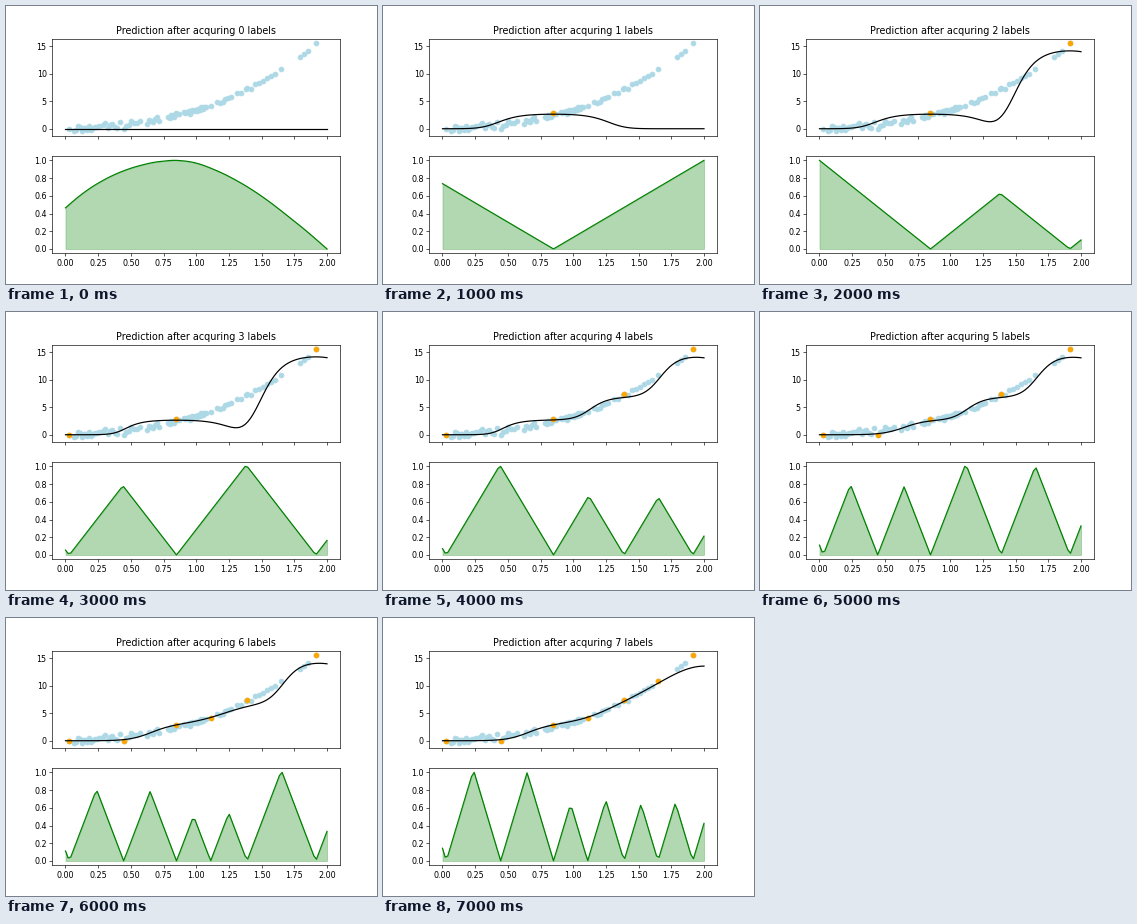
Write a matplotlib script that moves like this. It is 371 px wide and 278 px high and loops after 8000 ms.

```python
import numpy as np
import matplotlib.pyplot as plt
from matplotlib.animation import FuncAnimation

W, H, DPI = 371, 278, 58
STEPS = 8
RIDGE = 0.1    # pulls the prediction towards zero
GAMMA = 15     # sharpness of the Gaussian kernel

# Clumps of unlabelled points: first x, last x, count
CLUMPS = [(.065, .255, 14), (.285, .415, 8), (.46, .57, 6), (.625, .715, 7),
          (.785, .865, 8), (.905, 1.075, 15), (1.16, 1.265, 6),
          (1.31, 1.45, 5), (1.48, 1.6, 5), (1.795, 1.855, 3)]

# Points in the order they get labelled
QUERIES = np.array([(.849, 2.9), (1.914, 15.55), (.029, 0), (1.388, 7.35),
                    (.445, 0), (1.11, 4.15), (1.648, 10.9)])


def make_pool():
    """Noisy samples of a cubic trend; the noise fades to the right."""
    rng = np.random.default_rng(3)
    x = np.concatenate([np.linspace(*clump) for clump in CLUMPS])
    noise = rng.uniform(-0.7, 0.7, x.size) * (1 - x / 2.2)
    y = x + x**2 + 1.4 * x**3 + noise
    return np.vstack([np.column_stack([x, np.maximum(y, -0.55)]), QUERIES])


def distances(points):
    return np.abs(grid[:, None] - points[:, 0])


def predict(labels):
    """Kernel regression on the labelled points."""
    w = np.exp(-GAMMA * distances(labels) ** 2)
    return w @ labels[:, 1] / (w.sum(axis=1) + RIDGE)


def acquisition(labels):
    """Closeness to the whole pool at first, then distance to any label."""
    if len(labels) == 0:
        spread = distances(pool).mean(axis=1)
        score = spread.max() - spread
    else:
        score = distances(labels).min(axis=1)
    return score / score.max()


grid = np.linspace(0, 2, 100)
pool = make_pool()

fig, (top, bottom) = plt.subplots(2, 1, sharex=True, dpi=DPI,
                                  figsize=(W / DPI, H / DPI))
# Default margins of a 6.4 x 4.8 inch figure, which is a fraction larger
fx, fy = 6.4 * DPI / W, 4.8 * DPI / H
fig.subplots_adjust(left=0.125 * fx, right=0.9 * fx,
                    bottom=0.11 * fy, top=0.88 * fy)
top.set_xlim(-0.1, 2.1)
top.set_ylim(-1.4, 16.29)
top.set_yticks([0, 5, 10, 15])
bottom.set_ylim(-0.05, 1.05)
bottom.set_xticks(np.arange(0, 2.1, 0.25))
bottom.set_yticks(np.arange(0, 1.1, 0.2))

top.scatter(pool[:, 0], pool[:, 1], color="lightblue")
labelled = top.scatter([], [], color="orange")
curve, = top.plot(grid, 0 * grid, color="black")
title = top.set_title("")
score_line, = bottom.plot(grid, 0 * grid, color="green")
fills = []


def update(n):
    labels = QUERIES[:n]
    score = acquisition(labels)
    labelled.set_offsets(labels)
    curve.set_ydata(predict(labels))
    score_line.set_ydata(score)
    while fills:
        fills.pop().remove()
    fills.append(bottom.fill_between(grid, score, color="green", alpha=0.3))
    title.set_text(f"Prediction after acquring {n} labels")
    return labelled, curve, score_line, fills[0], title


anim = FuncAnimation(fig, update, frames=STEPS, interval=1000,
                     init_func=lambda: update(0), repeat=True)
plt.show()
```
